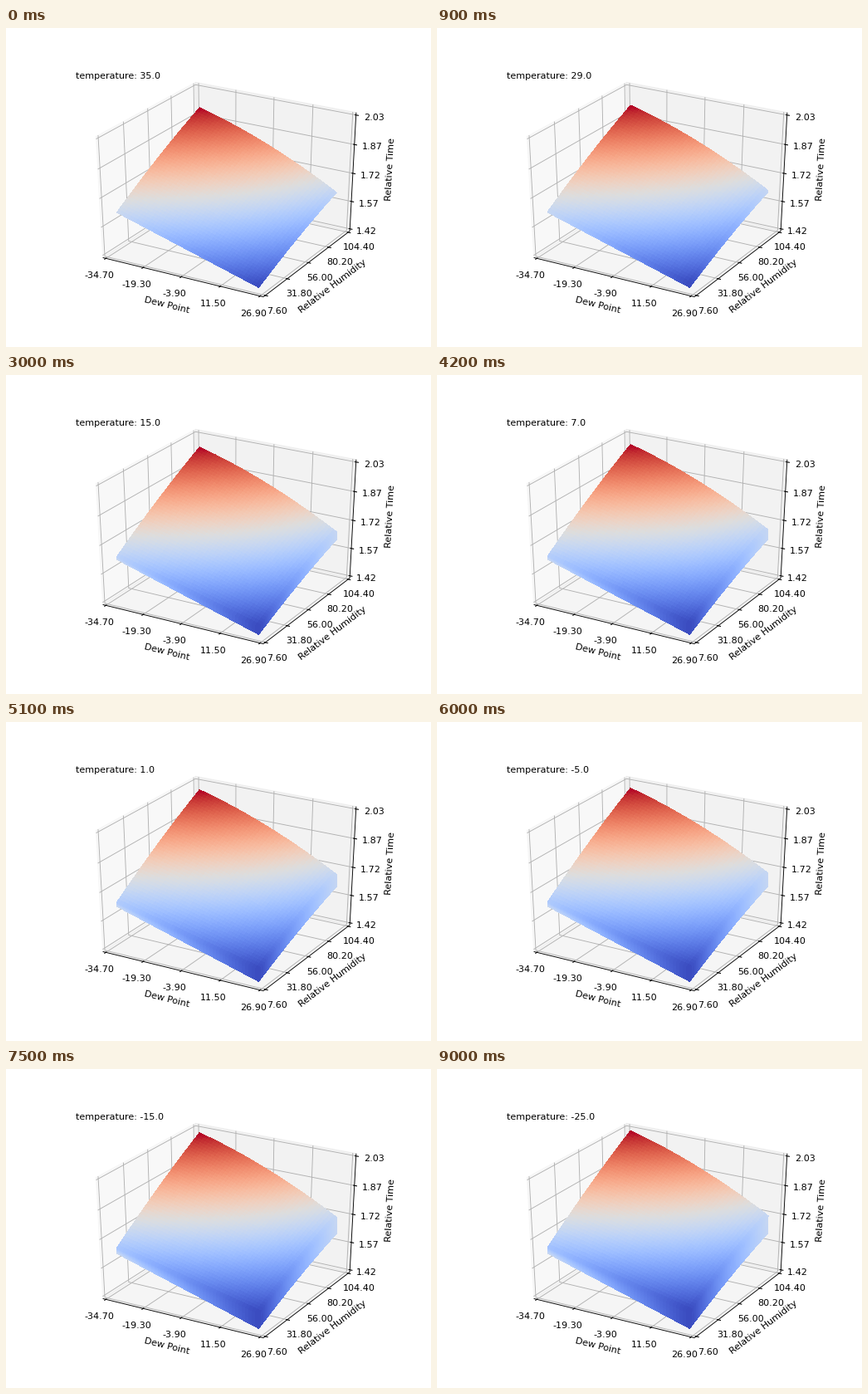
Animation of 512 by 384 pixels, one loop 9300 ms. Source, as a matplotlib script:

```python
import numpy as np
import matplotlib.pyplot as plt
from matplotlib.animation import FuncAnimation
from matplotlib.collections import LineCollection, PolyCollection

W, H, DPI = 512, 384, 80
FRAMES, STEP_MS = 31, 300
BOX = (64, 42.24, 396.8, 295.68)  # plot area: left, bottom, width, height
DIST = 10
EDGE = 0.5 + 1 / 48               # cube faces lie just outside the limits
DATA = 0.5 / 1.1                  # data leave a 5 % margin
N = 44                            # surface cells per side

plt.rcParams.update({"font.family": "DejaVu Sans", "font.size": 10})

elev, azim = np.radians(30), np.radians(-60)
eye = np.array([np.cos(azim) * np.cos(elev),
                np.sin(azim) * np.cos(elev), np.sin(elev)])
right = np.array([-np.sin(azim), np.cos(azim), 0])
up = np.cross(eye, right)


def project(p):
    """Map points of the centred unit cube to stage pixels, y upwards."""
    p = np.asarray(p, float)
    depth = DIST - p @ eye
    left, bottom, width, height = BOX
    x = left + (p @ right / depth + 0.095) / 0.185 * width
    y = bottom + (p @ up / depth + 0.095) / 0.185 * height
    return np.stack([x, y], axis=-1)


fig = plt.figure(figsize=(W / DPI, H / DPI), dpi=DPI, facecolor="white")
ax = fig.add_axes([0, 0, 1, 1])
ax.set_xlim(0, W)
ax.set_ylim(0, H)
ax.axis("off")


def draw_pane(axis, side, grey):
    a, b = [k for k in range(3) if k != axis]
    pts = np.zeros((4, 3))
    pts[:, axis] = side * EDGE
    pts[:, a] = np.array([-1, 1, 1, -1]) * EDGE
    pts[:, b] = np.array([-1, -1, 1, 1]) * EDGE
    ax.fill(*project(pts).T, fc=str(grey), ec=str(grey), alpha=0.5, lw=1, zorder=1)


def draw_lines(lines, color, width, zorder):
    ax.add_collection(LineCollection([project(l) for l in lines], colors=color,
                                     linewidths=width, zorder=zorder), autolim=False)


def draw_axis(axis, anchor, tick_dir, wall, lo, hi, name):
    """anchor: signs of the edge carrying the axis; wall: signs of the grid path."""
    anchor = np.array(anchor, float)

    def at(t, grow=0.0):
        p = anchor * (EDGE + grow)
        p[axis] = t
        return p

    ends = [at(-EDGE), at(EDGE)]
    draw_lines([ends], "black", 0.8, 3)

    grid, ticks = [], []
    for t, value in zip(np.linspace(-0.5, 0.5, 5), np.linspace(lo, hi, 5)):
        path = np.array(wall, float) * EDGE
        path[:, axis] = t
        grid.append(path)
        inner, outer = at(t), at(t)
        inner[tick_dir] -= anchor[tick_dir] / 120
        outer[tick_dir] += anchor[tick_dir] / 60
        ticks.append([inner, outer])
        ax.text(*project(at(t, 0.074)), f"{value:.2f}", ha="center", va="top", zorder=6)
    draw_lines(grid, "#b0b0b0", 0.8, 2)
    draw_lines(ticks, "black", 1.0, 3)

    dx, dy = project(ends[1]) - project(ends[0])
    ax.text(*project(at(0, 0.161)), name, ha="center", va="center",
            rotation=np.degrees(np.arctan2(dy, dx)), zorder=6)


draw_pane(0, -1, 0.95)
draw_pane(1, 1, 0.90)
draw_pane(2, -1, 0.925)
draw_axis(0, (0, -1, -1), 1, [(0, -1, -1), (0, 1, -1), (0, 1, 1)],
          -34.7, 26.9, "Dew Point")
draw_axis(1, (1, 0, -1), 0, [(1, 0, -1), (-1, 0, -1), (-1, 0, 1)],
          7.6, 104.4, "Relative Humidity")
draw_axis(2, (1, 1, 0), 0, [(-1, -1, 0), (-1, 1, 0), (1, 1, 0)],
          1.418, 2.026, "Relative Time")

# Cells run from far to near, so drawing order hides what is behind.
X, Y = np.meshgrid(np.linspace(-1, 1, N + 1), np.linspace(1, -1, N + 1), indexing="ij")
ci, cj = np.indices((N, N))
RIM = ((ci >= N - 2) | (cj >= N - 2)).ravel()


def height(i):
    s = i / (FRAMES - 1)
    g = s + 0.4 * s * (1 - s)
    low_left = -0.134 + 0.050 * g
    low_right = -0.500 + 0.150 * g
    high_left = 0.345 + 0.155 * g
    high_right = -0.156 + 0.156 * g
    u, v = (X + 1) / 2, (Y + 1) / 2
    flat = ((1 - u) * (1 - v) * low_left + u * (1 - v) * low_right
            + (1 - u) * v * high_left + u * v * high_right)
    return flat + 0.045 * (1 - X**2) * v + 0.02 * (1 - Y**2)


def cells(a):
    quads = np.stack([a[:-1, :-1], a[1:, :-1], a[1:, 1:], a[:-1, 1:]], axis=2)
    return quads.reshape(N * N, 4, *a.shape[2:])


def sheet(i):
    z = height(i)
    quads = cells(project(np.stack([X * DATA, Y * DATA, z], axis=-1)))
    mean = cells(z).mean(axis=1)
    return quads, plt.cm.coolwarm((mean - mean.min()) / np.ptp(mean))


sheets = [sheet(i) for i in range(FRAMES)]
surface = PolyCollection([], edgecolors="none", linewidths=0,
                         antialiaseds=False, zorder=5)
ax.add_collection(surface, autolim=False)
title = ax.text(BOX[0] + 0.05 * BOX[2], BOX[1] + 0.95 * BOX[3], "", zorder=6)


def update(i):
    # Sheets pile up; only the front rim of the older ones stays in sight.
    quads, colors = [], []
    for k in range(i + 1):
        q, c = sheets[k]
        keep = RIM if k < i - 1 else slice(None)
        quads.append(q[keep])
        colors.append(c[keep])
    surface.set_verts(np.concatenate(quads))
    surface.set_facecolor(np.concatenate(colors))
    title.set_text(f"temperature: {35.0 - 2 * i:.1f}")
    return surface, title


anim = FuncAnimation(fig, update, frames=FRAMES, interval=STEP_MS,
                     init_func=lambda: update(0), repeat=True, blit=False)
plt.show()
```
